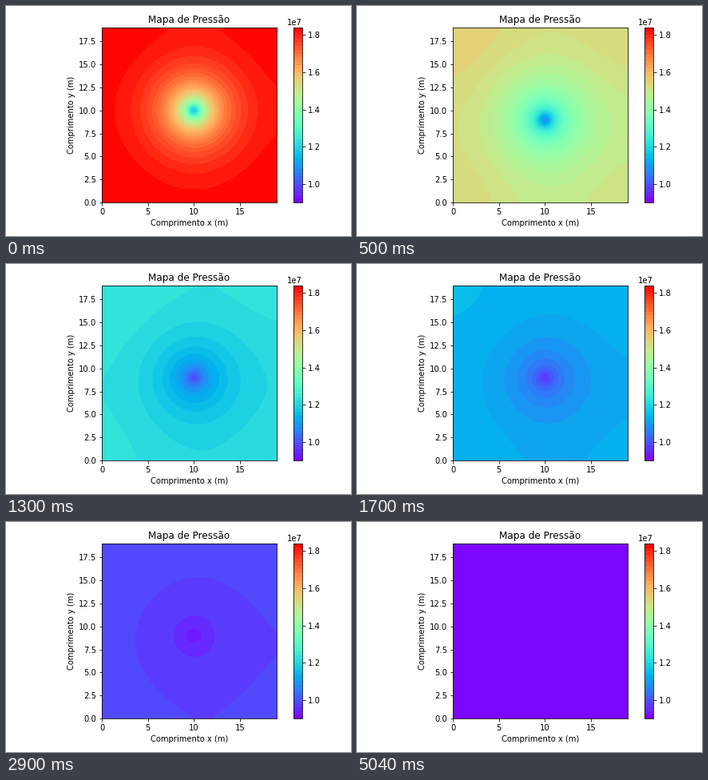
A matplotlib script that plays this animation: 432x288 px, repeating every 6.02 s.

```python
import numpy as np
import matplotlib.pyplot as plt
from matplotlib.animation import FuncAnimation

W, H, DPI = 432, 288, 72
LOOP, TICK = 6020, 20           # ms
SIDE, WELL = 20, 10.5           # closed square reservoir, well position
P_WELL, P_START = 9.0e6, 18.4e6
DECAY = 0.0832                  # slowest decay rate per time step
COUPLING, WIDTH = 4.2, 0.36     # well strength relative to diffusion, radius
LEAD = 0.65                     # time steps before the first picture
MODES = 32

LEVELS = np.linspace(P_WELL, P_START, 48)
GRID = np.linspace(0, SIDE - 1, 115)

# Start of every picture in ms; one time step is 100 ms
MARKS = [*range(0, 2700, 100), 2900, 3300, 3400, 4000, 5040]

K = np.arange(MODES) * np.pi / SIDE


def cosines(x):
    """Orthonormal cosine modes of a closed interval, one row per mode."""
    norm = np.where(K > 0, np.sqrt(2 / SIDE), np.sqrt(1 / SIDE))
    return norm[:, None] * np.cos(np.outer(K, x))


def solve_modes():
    """Eigenmodes of diffusion with one Gaussian sink, and the start weights."""
    sink = cosines([WELL])[:, 0] * np.exp(-(K * WIDTH) ** 2 / 2)
    sink = np.outer(sink, sink).ravel()
    k2 = np.add.outer(K**2, K**2).ravel()
    rates, vecs = np.linalg.eigh(np.diag(k2) + COUPLING * np.outer(sink, sink))
    start = (P_START - P_WELL) * SIDE * vecs[0]
    return rates * DECAY / rates[0], vecs, start


RATES, VECS, START = solve_modes()
BASIS = cosines(GRID + 0.5)


def pressure(step):
    weights = VECS @ (START * np.exp(-RATES * (step + LEAD)))
    field = P_WELL + BASIS.T @ weights.reshape(MODES, MODES) @ BASIS
    return field if step == 0 else field[::-1]


def place(x, y, w, h):
    return fig.add_axes([x / W, y / H, w / W, h / H])


def draw_map(step):
    return ax.contourf(GRID, GRID, pressure(step), levels=LEVELS, cmap="rainbow")


plt.rcParams.update({"font.family": "DejaVu Sans", "font.size": 10})
fig = plt.figure(figsize=(W / DPI, H / DPI), dpi=DPI, facecolor="white")
ax = place(120, 42, 219, 219)
cax = place(360, 42, 11, 219)

state = {"step": 0, "map": draw_map(0)}
bar = fig.colorbar(state["map"], cax=cax, ticks=np.arange(10, 19, 2) * 1e6)
cax.yaxis.set_offset_position("right")

ax.set(xlim=(0, SIDE - 1), ylim=(0, SIDE - 1),
       xticks=range(0, 16, 5), yticks=np.arange(0, 18, 2.5),
       title="Mapa de Pressão",
       xlabel="Comprimento x (m)", ylabel="Comprimento y (m)")


def update(i):
    step = max(ms for ms in MARKS if ms <= i * TICK) / 100
    if step != state["step"]:
        state["map"].remove()
        state.update(step=step, map=draw_map(step))
    return [state["map"]]


anim = FuncAnimation(fig, update, frames=LOOP // TICK, interval=TICK,
                     repeat=True, repeat_delay=0, blit=False)
plt.show()
```
